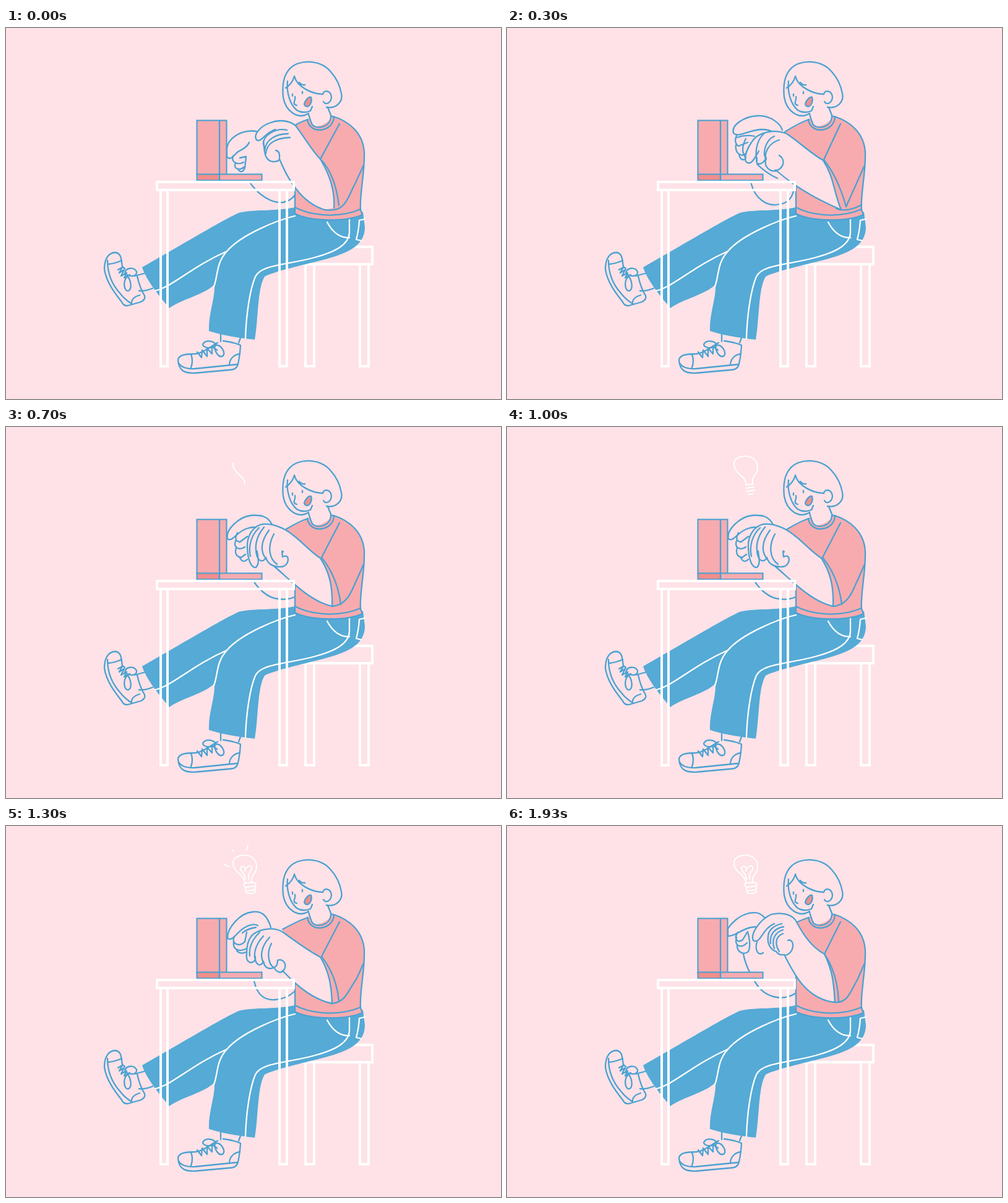
These frames come from a looping animation (800x600 px, 1.96 s). An HTML page:

```html
<!DOCTYPE html>
<html lang="en">
<head>
<meta charset="utf-8">
<title>Typing at a desk</title>
<style>
  html, body { margin: 0; width: 100%; height: 100%; overflow: hidden; background: #fee2e7; }
  svg { display: block; width: 800px; height: 600px; }
  path, rect { fill: none; stroke: #4ba1d1; stroke-width: 2.3; stroke-linecap: round; stroke-linejoin: round; }
  .skin { fill: #fee2e7; }
  .pink { fill: #f7abaf; }
  .deep { fill: #f18e8c; }
  .fill { stroke: none; }
  #pants { fill: #55aad6; stroke: none; }
  .white path, .white rect { stroke: #fff; }
  .wood rect { stroke-width: 4; stroke-linecap: square; stroke-linejoin: miter; }
  .laptop rect { stroke-width: 2.1; stroke-linejoin: miter; }
  #bulb path { stroke-width: 1.9; }
  #rays path { vector-effect: non-scaling-stroke; stroke-width: 1.7; }
</style>
</head>
<body>
<svg viewBox="0 0 800 600">
  <g class="white wood">
    <rect x="456" y="354" width="136" height="28"/>
    <rect x="484" y="382" width="14" height="165"/>
    <rect x="572" y="382" width="14" height="165"/>
  </g>

  <g id="shoes">
    <path d="M188 386C186 374 187 365 177 363C166 363 159 373 159 390C162 411 176 429 187 443Q190 450 197 449L218 443Q226 439 224 433Q216 420 212 401"/>
    <path d="M164 376C164 399 173 417 185 430Q192 439 203 446M165 382Q176 381 187 376M188 386L192 389"/>
    <path d="M181 391L188 387L183 396L191 391L186 401L195 396L191 404L200 399"/>
    <path d="M192 397C193 387 207 386 211 394C212 402 201 403 193 398M196 402C188 410 191 427 198 425C204 422 202 409 197 402M203 446Q202 436 216 432"/>
    <path d="M208 401L223 397M215 425Q225 426 237 421"/>
    <path d="M347 494V507M379 501L376 509"/>
    <path d="M342 509C329 516 318 526 306 527C292 527 279 528 278 537C279 552 286 559 306 558L361 553Q373 553 375 543Q378 530 379 513Q367 508 351 506"/>
    <path d="M279 542Q285 552 305 551L374 544M299 528Q303 538 299 549M361 544C362 533 370 528 378 527"/>
    <path d="M309 524L316 533L317 521L325 531L325 518L333 527L333 515L341 521"/>
    <path d="M338 515C326 520 315 515 319 510C324 504 336 506 340 513M338 513C347 511 355 524 351 530C344 535 337 523 337 514"/>
  </g>

  <path id="pants" d="M467 290C431 297 399 293 376 299C350 311 302 340 272 357L220 387C225 402 236 420 264 453C287 437 319 432 337 415C338 438 327 462 328 490Q355 499 402 504C408 471 406 421 418 402C445 389 507 379 541 366C565 357 580 344 580 322L577 298Z"/>
  <g class="white">
    <path d="M467 304C440 310 380 334 357 361C339 381 343 400 336 418"/>
    <path d="M241 425C270 418 300 386 357 361"/>
    <path d="M387 502C388 465 394 423 403 402C413 382 457 383 499 371C533 362 554 350 555 331L555 305"/>
    <path d="M519 314Q533 340 555 339M580 309L571 311Q570 328 566 342L574 344"/>
  </g>

  <path id="far" class="skin"/>
  <path id="farLines"/>

  <path id="body" class="pink fill"/>
  <path d="M467 240V299"/>
  <path d="M529 143C554 151 577 169 579 201C580 236 571 269 573 294L576 302"/>
  <path d="M467 290C493 304 539 308 573 293M466 300C493 313 548 314 576 302"/>
  <path id="shoulder"/>

  <path class="skin fill" d="M489 137L493 157Q508 164 526 146L519 126Z"/>
  <path d="M488 135Q490 145 495 157M519 126L525 141"/>
  <path class="pink" d="M487 148C491 174 529 168 530 144L525 142C525 162 500 165 494 155"/>
  <path class="skin" d="M489 138C472 149 452 135 448 112C445 84 452 66 470 58C491 50 514 57 525 71C535 82 540 95 542 106C545 120 533 131 518 128"/>
  <path d="M455 86C453 104 459 124 470 133Q480 139 492 134L495 127"/>
  <path d="M466 78Q463 90 452 97M466 78C471 97 497 107 512 107M474 88Q478 93 483 92"/>
  <path d="M512 107C514 99 525 101 526 112C525 122 516 125 513 119"/>
  <path d="M463 107V110M479 103V106M467 111C469 117 461 123 470 125"/>
  <path class="deep" d="M482 123C484 116 490 110 493 112C495 118 492 126 487 127Q483 127 482 123Z"/>

  <path id="nearFill" class="skin fill"/>
  <path id="near"/>
  <path id="nearLines"/>

  <g class="laptop">
    <rect class="pink" x="308.500" y="149.500" width="48" height="88"/>
    <rect class="pink" x="345" y="236.500" width="68.500" height="10"/>
    <rect class="deep" x="308.500" y="236.500" width="36.500" height="10"/>
    <path d="M345 150V246"/>
  </g>

  <g class="white wood">
    <rect x="250" y="262" width="11" height="285"/>
    <rect x="442" y="262" width="12" height="285"/>
    <rect x="244" y="249" width="221" height="13"/>
  </g>

  <g id="bulb" class="white">
    <path id="glass" pathLength="1" stroke-dasharray="1 1" d="M386 92C387 79 365 75 367 58C369 47 388 44 398 51C409 59 405 74 399 80Q396 85 397 91"/>
    <path id="thread" d="M386 94L398 92M386 99L399 97M387 104L400 102M391 109L397 108"/>
    <path id="cap" d="M385 93Q394 90 402 92Q406 95 402 97L388 99Q382 97 385 93M388 99Q385 104 389 105L402 103Q405 100 402 97M389 105Q386 110 395 109Q405 109 402 103"/>
    <path id="wire" d="M387 86C386 75 378 74 379 67C383 62 389 68 386 73C387 66 396 61 397 67C399 73 390 73 392 86"/>
    <g id="rays"><path/></g>
  </g>
</svg>

<script>
const $ = id => document.getElementById(id);
const draw = (id, d) => $(id).setAttribute('d', d);
const show = (id, on) => $(id).style.display = on ? '' : 'none';

// Arm drawings: far hand, its finger lines, near arm, its finger lines, sleeve, left shoulder
const poses = {
  A: {
    far: 'M410 170C403 164 382 166 370 175Q358 183 357 195V208C362 216 369 205 375 200Q390 193 393 185',
    farLines: 'M368 206C361 216 375 223 384 217M371 218C366 229 380 231 384 225M376 230Q382 236 386 226L388 209M378 210L388 208M393 248C407 270 430 284 447 282Q460 280 467 270',
    near: 'M530 291C532 261 522 235 508 212C494 198 480 173 468 158C458 149 440 148 428 153C411 158 399 173 405 181C412 186 418 170 435 164M416 184C418 195 416 213 430 216Q440 217 442 212C453 239 475 282 515 294',
    nearLines: 'M416 188C415 173 437 161 454 165M418 198C419 181 436 171 456 171M420 203C421 187 435 178 459 177M442 210Q443 199 436 198',
    sleeve: 'M539 155L508 212C526 229 535 260 538 287M515 294C550 299 552 274 564 252L578 222',
    shoulder: '468 157'
  },
  B: {
    far: 'M445 165C441 153 424 141 405 142C383 143 362 157 366 170C374 178 388 166 410 164Q424 164 432 169',
    farLines: 'M371 174Q366 185 374 191L389 185M370 189Q368 203 380 206L388 202M375 204Q377 216 386 212M394 248C399 275 420 290 440 285Q458 283 463 264M404 220Q419 235 437 243',
    near: 'M540 294C528 265 528 240 511 214C491 203 472 184 452 171C432 163 405 168 395 185Q382 205 386 216C394 224 400 211 407 199M404 210C400 224 413 222 419 210C414 224 424 233 436 231C462 254 500 277 540 294',
    nearLines: 'M372 177Q386 172 400 175M386 179Q376 198 386 210M415 171C400 185 402 208 404 215M432 175C418 181 412 203 419 212M440 181C423 186 416 201 418 213M440 206C453 215 444 231 433 230',
    sleeve: 'M539 155L512 213C532 238 542 267 548 289L578 222M532 292Q549 299 573 286',
    shoulder: '449 168'
  },
  C: {
    far: 'M439 166C436 151 418 138 399 138C376 138 357 156 359 171C364 178 375 162 390 160',
    farLines: 'M385 163Q398 159 411 157Q417 161 406 164Q393 166 382 172M370 171C366 182 372 191 381 184L386 174M370 184Q370 199 381 196L388 190M371 195Q374 207 383 206M393 238C391 264 404 287 424 293C445 296 463 282 465 265',
    near: 'M528 290C527 257 523 235 508 212C490 202 467 188 455 177C440 166 418 167 403 175C390 182 391 199 383 213Q378 224 384 230C394 234 400 219 406 211M403 209C402 223 413 224 416 215C416 231 431 241 446 236C464 251 490 276 528 290',
    nearLines: 'M405 177Q393 190 391 205M418 180C407 189 402 207 404 214M429 180C417 194 413 210 418 220M439 185C423 198 420 212 427 223Q435 232 439 219Q449 223 447 234',
    sleeve: 'M539 155L510 211C531 234 540 264 543 287L577 232M528 290Q552 294 573 284',
    shoulder: '447 168'
  },
  D: {
    far: 'M430 158C423 143 410 142 396 143C377 145 354 166 358 181C366 187 374 168 390 164Q402 160 410 164',
    farLines: 'M374 171Q367 184 378 186L390 177M371 184C367 196 378 200 386 194M372 195Q368 209 380 211L387 206M377 210Q383 222 390 214M398 245C405 260 423 277 440 278Q456 280 466 275',
    near: 'M527 290C528 258 523 235 508 212C492 202 478 185 464 175C449 162 426 154 411 158C395 164 389 181 390 196C391 215 396 228 404 227C411 220 406 207 406 201M404 201C406 220 417 219 420 211C423 223 434 227 446 226M433 225C455 243 490 282 527 290',
    nearLines: 'M409 163C397 174 391 192 395 209M417 162C402 180 402 197 406 208M425 167C410 187 412 203 420 213M433 173C422 193 425 213 438 222M448 202Q445 197 447 210C459 203 459 224 446 226',
    sleeve: 'M539 155L510 211C530 235 538 263 541 287M527 290C553 288 559 263 566 249L578 222',
    shoulder: '453 165'
  },
  E: {
    far: 'M428 164C422 144 413 137 398 139C378 141 357 165 358 182C368 187 374 169 388 163Q400 157 407 161',
    farLines: 'M404 164Q390 166 382 173M369 179C363 190 377 197 386 187L389 172M368 188C366 201 379 204 389 198M373 202Q379 208 388 204M401 250C405 272 417 282 434 281Q453 280 467 267',
    near: 'M527 287C526 258 522 235 508 212C489 202 467 186 448 172C433 162 411 167 401 174C390 182 389 197 389 206C387 221 397 225 403 216M403 211C402 225 412 229 416 219C418 231 427 232 433 229Q440 240 448 235C466 254 493 280 527 287',
    nearLines: 'M410 172C398 183 392 197 394 210M416 178C402 193 400 208 403 217M426 180C412 195 410 212 417 222M429 190C421 205 424 224 433 229Q439 227 439 217C451 213 456 230 446 235',
    sleeve: 'M539 155L510 211C528 234 536 260 538 283M527 287C549 285 553 266 566 248L578 222',
    shoulder: '447 167'
  },
  F: {
    far: 'M416 148C409 140 402 139 391 141C374 145 362 158 357 166V178C367 179 379 167 394 164L402 163',
    farLines: 'M373 172C366 181 372 191 381 184L388 172M371 180C367 194 378 199 388 189M372 192C371 205 384 209 390 203Q395 193 389 171M404 187C400 201 406 211 414 205M382 207C386 228 398 250 408 262C424 280 450 282 467 270',
    near: 'M530 285C528 252 526 234 513 207C494 197 480 178 469 157C463 142 443 139 427 143C409 151 393 174 398 185C410 192 412 166 432 158M422 179C420 192 428 201 435 203Q440 210 448 208C461 232 480 280 530 285',
    nearLines: 'M422 181C421 169 431 161 444 158M426 190C424 174 434 165 447 163M432 198C426 181 436 171 446 168M440 203C431 188 436 178 446 174M454 185C464 181 467 204 450 209',
    sleeve: 'M539 155L513 207C529 231 535 260 536 283M530 285C551 287 556 266 566 249L578 222',
    shoulder: '466 157'
  }
};

const order = 'AFDBECEDAFDBCEDAFDEAF';
const rayShapes = [
  'M360 66L352 62M369 42L365 38M389 39L391 31',
  'M364 62L357 58M377 46L373 40M398 43L400 35'
];
// step: [shape, spread from the bulb's centre]
const rayAt = { 12: [0, .86], 13: [0, 1], 14: [0, 1.21], 16: [1, 1], 17: [1, 1.17], 18: [1, 1.34] };

function drawPose(p) {
  draw('far', p.far);
  draw('farLines', p.farLines);
  draw('body', `M490 147L${p.shoulder}L467 250V300C493 313 548 314 576 302L573 294C571 269 580 236 579 201C577 169 554 151 529 143Z`);
  draw('shoulder', `M488 148Q475 152 ${p.shoulder}`);
  // join the separate strokes so that the whole arm is covered
  draw('nearFill', p.near.replace(/(?!^)M/g, 'L'));
  draw('near', p.near);
  draw('nearLines', p.nearLines + p.sleeve);
}

function drawBulb(step) {
  show('bulb', step >= 7);
  $('glass').style.strokeDashoffset = 1 - Math.min(1, (step - 6) / 3);
  show('thread', step === 10);
  show('cap', step > 10);
  show('wire', step > 10);
  const ray = rayAt[step];
  show('rays', ray);
  if (!ray) return;
  const path = $('rays').firstElementChild;
  path.setAttribute('d', rayShapes[ray[0]]);
  path.setAttribute('transform', `translate(387 72) scale(${ray[1]}) translate(-387 -72)`);
}

let last = -1;
const start = performance.now();
function tick() {
  const t = (performance.now() - start) % 1960;
  const step = t >= 1930 ? 20 : Math.floor(t / 100);
  if (step !== last) {
    drawPose(poses[order[step]]);
    drawBulb(step);
    last = step;
  }
  requestAnimationFrame(tick);
}
tick();
</script>
</body>
</html>
```
